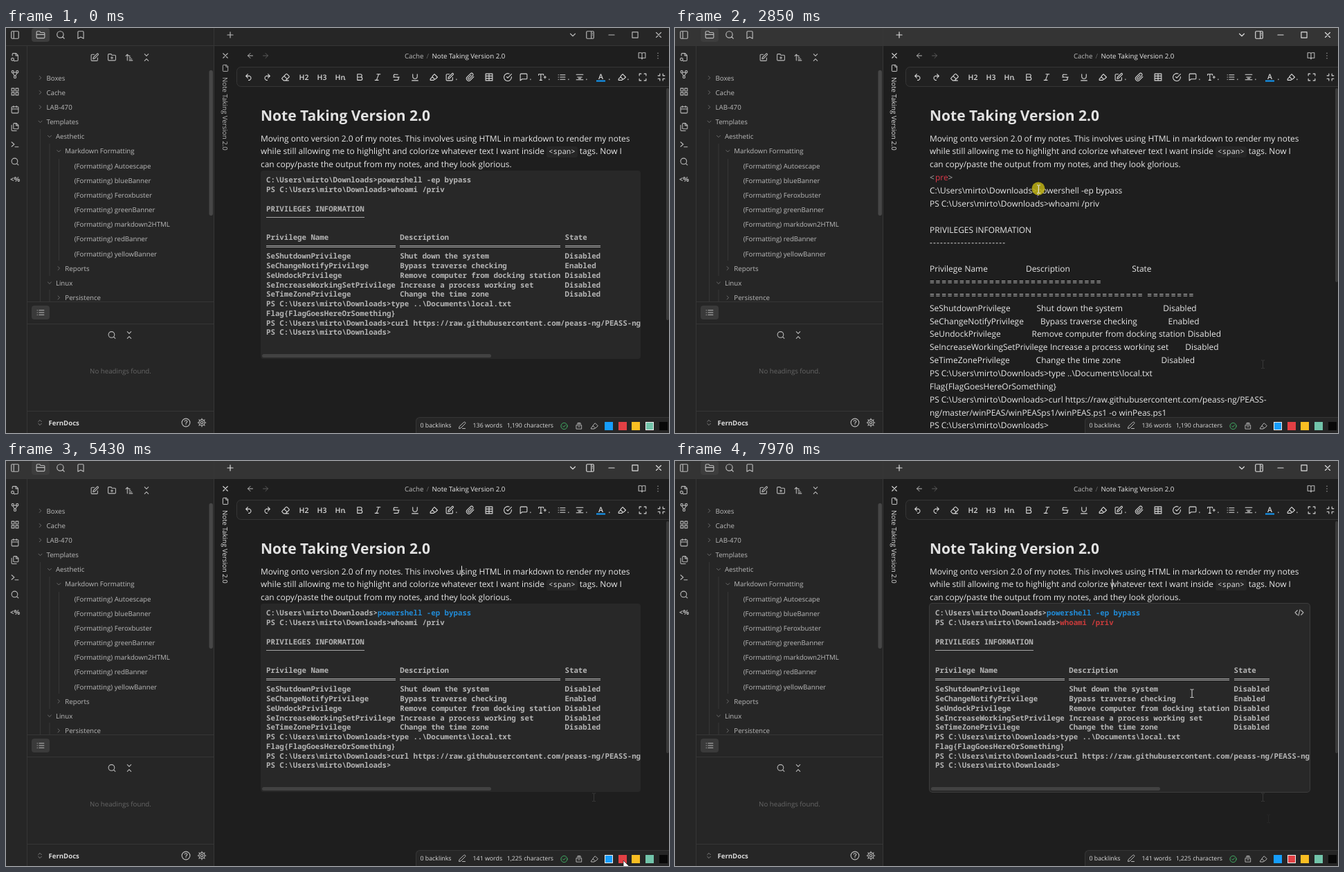
Recreate the animation shown at these times as an HTML page. Size 958 by 585 pixels, loop 8000 ms.

```html
<!DOCTYPE html>
<html lang="en">
<head>
<meta charset="utf-8">
<title>Note editor</title>
<style>
html, body { margin: 0; width: 100%; height: 100%; overflow: hidden; background: #1e1e1e; }
#stage { position: absolute; left: 0; top: 0; width: 958px; height: 585px; overflow: hidden; background: #1e1e1e;
  font-family: "Open Sans", "Noto Sans", sans-serif; color: #e8e8e8; text-rendering: geometricPrecision; }
#stage > *, #status > .abs { position: absolute; }
svg { left: 0; top: 0; overflow: visible; display: block; }
.icon { fill: none; stroke-width: 2; stroke-linecap: round; stroke-linejoin: round; }
.line { height: 18.86px; line-height: 18.86px; font-size: 11.955px; white-space: pre; }
#intro { left: 368px; top: 150.5px; }
#editor { left: 368px; top: 207.1px; }
.table { word-spacing: .34px; }
.dashes { letter-spacing: 1.17px; }
.equals { letter-spacing: 1.77px; }
code, #block { font-family: "Noto Sans Mono", "DejaVu Sans Mono", monospace; font-size: 10.74px; }
code { background: #262626; border-radius: 3px; padding: 1px 3px; color: #dadada; }
mark { display: inline-block; vertical-align: top; height: 100%; min-width: 0; color: inherit; background: none; padding-right: 3px; }
mark.lead { padding: 0; }
.selected mark { background: #3b3057; }
.selected.partial mark.lead { background: none; }
i { font-style: normal; color: #a8a8a8; letter-spacing: 1.1px; }
b { font-weight: 400; color: #dc3a4b; }
u { text-decoration: none; color: #41c269; }
.drag { display: inline-block; vertical-align: top; height: 100%; background: linear-gradient(#3b3057, #3b3057) no-repeat 0 0 / 0 100%; }
#block { left: 368px; top: 206px; width: 549px; height: 272px; overflow: hidden; background: #282828; border-radius: 4px;
  color: #b5b5b5; font-weight: 600; white-space: pre; }
#block.hover { box-shadow: 0 0 0 1px #3c3c3c; }
#block div { height: 13.75px; line-height: 13.75px; padding-left: 8px; }
#block div:first-child { margin-top: 8.4px; }
#block s { display: inline-block; height: 3px; vertical-align: 2.7px; box-sizing: border-box; border: solid #a5a5a5; border-width: 1px 0; }
#block s.single { border-bottom: 0; height: 1px; vertical-align: 4.4px; }
#bar { left: 2px; top: 265px; width: 331px; height: 5px; border-radius: 3px; background: #424242; position: absolute; }
#status { right: 0; bottom: 0; height: 22px; padding: 0 167px 0 6px; display: flex; align-items: center; white-space: pre;
  background: #262626; border: solid #363636; border-width: 1px 0 0 1px; border-radius: 6px 0 0 0; font-size: 8.8px; color: #dadada; }
#status > svg { position: static; margin: 0 9.5px; }
#chars { margin-left: 6.5px; }
.swatch { width: 12px; height: 12px; top: 6px; box-sizing: border-box; }
.swatch.on { border: 1px solid #eee; }
#scroll { left: 954px; top: 87px; width: 4px; border-radius: 2px; background: #3a3a3a; }
</style>
</head>
<body>
<div id="stage"></div>
<script>
const LOOP = 8000;
const PATHS = {
  panel: 'M5 3h14a2 2 0 0 1 2 2v14a2 2 0 0 1-2 2H5a2 2 0 0 1-2-2V5a2 2 0 0 1 2-2zM9 3v18',
  panelRight: 'M5 3h14a2 2 0 0 1 2 2v14a2 2 0 0 1-2 2H5a2 2 0 0 1-2-2V5a2 2 0 0 1 2-2zM15 3v18M18 8h.1M18 12h.1',
  folder: 'M4 20h16a2 2 0 0 0 2-2V8a2 2 0 0 0-2-2h-8l-2-3H4a2 2 0 0 0-2 2v13a2 2 0 0 0 2 2zM2 11h20',
  folderPlus: 'M4 20h16a2 2 0 0 0 2-2V8a2 2 0 0 0-2-2h-8l-2-3H4a2 2 0 0 0-2 2v13a2 2 0 0 0 2 2zM12 10v6M9 13h6',
  search: 'M19 11a8 8 0 1 1-16 0a8 8 0 0 1 16 0zM21 21l-4.3-4.3',
  bookmark: 'M19 21l-7-4-7 4V5a2 2 0 0 1 2-2h10a2 2 0 0 1 2 2z',
  plus: 'M5 12h14M12 5v14', minus: 'M5 12h14', square: 'M5 5h14v14H5z', close: 'M18 6L6 18M6 6l12 12',
  down: 'M6 9l6 6 6-6', right: 'M9 18l6-6-6-6', updown: 'M7 15l5 5 5-5M7 9l5-5 5 5', collapse: 'M7 21l5-5 5 5M7 3l5 5 5-5',
  fileSearch: 'M5 8V4a2 2 0 0 1 2-2h8l5 5v13a2 2 0 0 1-2 2h-6M14 2v6h6M9 18a3.5 3.5 0 1 1-7 0a3.5 3.5 0 0 1 7 0zM9 21l2 2',
  file: 'M15 2H6a2 2 0 0 0-2 2v16a2 2 0 0 0 2 2h12a2 2 0 0 0 2-2V7zM14 2v6h6',
  graph: 'M9 5a3 3 0 1 1-6 0a3 3 0 0 1 6 0zM21 5a3 3 0 1 1-6 0a3 3 0 0 1 6 0zM15 19a3 3 0 1 1-6 0a3 3 0 0 1 6 0zM6 8l5 8M18 8l-5 8M8 7l9 0',
  grid: 'M3 3h7v7H3zM14 3h7v7h-7zM14 14h7v7h-7zM3 14h7v7H3z',
  calendar: 'M5 4h14a2 2 0 0 1 2 2v13a2 2 0 0 1-2 2H5a2 2 0 0 1-2-2V6a2 2 0 0 1 2-2zM3 10h18M8 2v4M16 2v4',
  files: 'M16 2h-6a2 2 0 0 0-2 2v11a2 2 0 0 0 2 2h9a2 2 0 0 0 2-2V7zM3 7v13a2 2 0 0 0 2 2h11M15 2v6h6',
  terminal: 'M3 18l7-6-7-6M12 19h9',
  edit: 'M11 4H5a2 2 0 0 0-2 2v13a2 2 0 0 0 2 2h13a2 2 0 0 0 2-2v-6M18.5 2.5a2.1 2.1 0 0 1 3 3L12 15l-4 1 1-4z',
  sort: 'M3 8l4-4 4 4M7 4v16M12 12h4M12 16h7M12 20h9M12 8h2',
  list: 'M8 6h13M8 12h13M8 18h13M3 6h.5M3 12h.5M3 18h.5',
  help: 'M22 12a10 10 0 1 1-20 0a10 10 0 0 1 20 0zM9 9a3 3 0 0 1 6 1c0 2-3 2-3 4M12 17h.1',
  gear: 'M19 12a7 7 0 1 1-14 0a7 7 0 0 1 14 0zM15 12a3 3 0 1 1-6 0a3 3 0 0 1 6 0zM12 2v3M12 19v3M2 12h3M19 12h3M5 5l2 2M17 17l2 2M5 19l2-2M17 7l2-2',
  back: 'M12 19l-7-7 7-7M19 12H5', forward: 'M12 5l7 7-7 7M5 12h14',
  book: 'M12 6v15M3 4h6a3 3 0 0 1 3 3a3 3 0 0 1 3-3h6v14h-7l-2 2-2-2H3z',
  dots: 'M11.500 5h1M11.500 12h1M11.500 19h1',
  undo: 'M9 14L4 9l5-5M4 9h10a6 6 0 0 1 0 11h-3', redo: 'M15 14l5-5-5-5M20 9H10a6 6 0 0 0 0 11h3',
  eraser: 'M7 21l-4-4a2 2 0 0 1 0-3L13 4a2 2 0 0 1 3 0l5 5a2 2 0 0 1 0 3l-9 9zM8 9l8 8M12 21h8',
  bold: 'M6 4h8a4 4 0 0 1 0 8H6zM6 12h9a4 4 0 0 1 0 8H6z', italic: 'M19 4h-9M14 20H5M15 4L9 20',
  strike: 'M16 5H9a3 3 0 0 0-2 6M14 12a4 4 0 0 1 0 8H6M4 12h16', under: 'M6 4v6a6 6 0 0 0 12 0V4M4 21h16',
  marker: 'M9 11l-6 6v3h9l3-3M22 12l-5 5a2 2 0 0 1-3 0l-5-5a2 2 0 0 1 0-3l5-5z',
  clip: 'M21 11l-9 9a6 6 0 0 1-8.500-8.500l9-9a4 4 0 0 1 5.700 5.700l-9 9a2 2 0 0 1-3-3l8-8',
  table: 'M3 3h18v18H3zM3 9h18M3 15h18M12 3v18',
  check: 'M22 11v1a10 10 0 1 1-6-9M22 4L12 14l-3-3', checkRing: 'M22 12a10 10 0 1 1-20 0a10 10 0 0 1 20 0zM8 12l3 3 5-6',
  comment: 'M21 15a2 2 0 0 1-2 2H8l-5 4V5a2 2 0 0 1 2-2h14a2 2 0 0 1 2 2z',
  type: 'M2 7V4h13v3M8 4v16M5 20h6M16 12h6M19 9v6', align: 'M3 5h18M6 12h12M3 19h18M9 15.500h6',
  expand: 'M8 3H3v5M21 8V3h-5M3 16v5h5M16 21h5v-5', shrink: 'M8 3v5H3M21 8h-5V3M3 16h5v5M16 21v-5h5',
  pencil: 'M17 3a2.800 2.800 0 0 1 4 4L8 20l-5 1 1-5zM13 21h8', stack: 'M4 9h16v12H4zM6 5h12M8 2h8M9 14h6',
  code: 'M17 18l6-6-6-6M7 6l-6 6 6 6M14 4l-4 16'
};
const GREY = '#bababa', LINE = '#363636';
const icon = (name, x, y, size = 13, color = GREY) =>
  `<path class="icon" d="${PATHS[name]}" stroke="${color}" transform="translate(${x - size / 2} ${y - size / 2}) scale(${size / 24})"/>`;
const icons = (names, spots, size, color) => names.split(' ').map((n, i) => icon(n, ...spots[i], size, color)).join('');
const row = (y, ...xs) => xs.map(x => [x, y]);
const column = (x, ...ys) => ys.map(y => [x, y]);
const text = (s, x, y, size = 9.7, fill = GREY, more = '') =>
  `<text x="${x}" y="${y}" font-size="${size}" fill="${fill}" ${more}>${s}</text>`;
const rect = (x, y, w, h, fill, r = 0, more = '') =>
  `<rect x="${x}" y="${y}" width="${w}" height="${h}" fill="${fill}" rx="${r}" ${more}/>`;
const esc = s => s.replace(/&/g, '&amp;').replace(/</g, '&lt;').replace(/>/g, '&gt;');
const svg = body => `<svg width="958" height="585">${body}</svg>`;

// File tree: depth, chevron, label
const tree = [
  [0, 'right', 'Boxes'], [0, 'right', 'Cache'], [0, 'right', 'LAB-470'], [0, 'down', 'Templates'],
  [1, 'down', 'Aesthetic'], [2, 'down', 'Markdown Formatting'],
  ...'Autoescape blueBanner Feroxbuster greenBanner markdown2HTML redBanner yellowBanner'.split(' ').map(n => [3, '', `(Formatting) ${n}`]),
  [2, 'right', 'Reports'], [1, 'down', 'Linux'], [2, 'right', 'Persistence']
].map(([depth, arrow, label], i) => {
  const y = 71.9 + 21.17 * i;
  return (arrow ? icon(arrow, 49.5 + 13.4 * depth, y, 10, '#777') : '') + text(label, 58.5 + 13.4 * depth, y + 3.6);
}).join('');

function chrome() {
  const title = 'Note Taking Version 2.0';
  const tool = '#dadada';
  return rect(0, 0, 301, 585, '#262626') +
    rect(0, 0, 958, 25, '#262626', 0, 'id="titlebar"') + rect(0, 25, 958, 1, LINE) +
    rect(30, 26, 1, 559, LINE) + rect(300, 0, 1, 585, LINE) +
    [395, 427, 553].map(y => rect(31, y, 269, 1, LINE)).join('') +
    rect(37, 0, 26, 20, '#3d3d3d', 4) + rect(37, 401, 26, 20, '#3a3a3a', 4) +
    icons('panel folder search bookmark', row(10, 13, 50, 79, 108), 14) +
    // Parts that brighten when the window gains focus
    `<g id="controls">${icons('plus down panelRight minus square close', row(10, 324, 819, 844, 875, 909, 943), 14, 'currentColor') +
      icon('close', 317, 40, 13, 'currentColor') + icon('file', 317, 58, 11, 'currentColor') +
      text(title, 0, 0, 9.7, 'currentColor', 'transform="translate(313 71) rotate(90)"')}</g>` +
    icons('fileSearch graph grid calendar files terminal search', column(13, 42, 67, 92, 118, 143, 168, 193), 13) +
    text('&lt;%', 6, 222, 9.7, GREY, 'font-weight="700"') +
    icons('edit folderPlus sort collapse', row(42.5, 128, 153, 178, 203), 13) +
    rect(49, 146, 1, 249, LINE) + rect(62.5, 167, 1, 191, LINE) + rect(62.5, 378, 1, 17, LINE) + rect(76, 189, 1, 147, LINE) +
    tree + rect(293.5, 61, 5.5, 210, '#464646', 2.7) +
    icons('list search collapse', [[50, 411], [153, 443.5], [178, 443.5]], 13) +
    text('No headings found.', 165.5, 498.5, 9.7, '#666', 'text-anchor="middle"') +
    icon('updown', 49, 570, 11, '#888') + text('FernDocs', 61.5, 573.6, 9.6, '#dadada', 'font-weight="700"') +
    icons('help gear', row(570, 260, 283), 14) +
    icon('back', 353, 40, 12) + icon('forward', 375, 40, 12, '#5a5a5a') +
    text('Cache', 576, 43.7) + text('/', 607.5, 43.7, 9.7, '#666') + text(title, 615.5, 43.7, 9.7, '#e8e8e8') +
    icons('book dots', row(40, 919, 942), 13) +
    rect(333.5, 56.5, 640, 28, '#212121', 6, `stroke="${LINE}"`) +
    icons('undo redo eraser', row(71, 351, 377, 404), 13, tool) +
    ['H2', 'H3', 'Hn'].map((s, i) => text(s, 423.5 + 26 * i, 75, 10.5, tool, 'font-weight="600"')).join('') +
    icons('bold italic strike under marker edit clip table check comment type list align',
      row(71, 511, 537, 564, 591, 618, 641, 671, 698, 725, 748, 775, 803, 829), 13, tool) +
    text('A', 856, 74, 10.5, tool, 'font-weight="600"') + rect(853, 75.5, 13, 2, '#149dff') +
    icons('marker expand shrink', row(71, 890, 920, 947), 13, tool) +
    [489, 650, 757, 784, 812, 838, 871, 898].map(x => rect(x, 73.5, 1.6, 1.6, '#999')).join('') +
    text(title, 368, 133.6, 21, '#e2e2e2', 'font-weight="700"');
}

const path = 'C:\\Users\\mirto\\Downloads>';
const prompt = 'PS ' + path;
const privileges = [
  ['SeShutdownPrivilege', 'Shut down the system', 'Disabled'],
  ['SeChangeNotifyPrivilege', 'Bypass traverse checking', 'Enabled'],
  ['SeUndockPrivilege', 'Remove computer from docking station', 'Disabled'],
  ['SeIncreaseWorkingSetPrivilege', 'Increase a process working set', 'Disabled'],
  ['SeTimeZonePrivilege', 'Change the time zone', 'Disabled']
];
const tableRow = ([a, b, c]) => a.padEnd(30) + b.padEnd(37) + c;
const header = tableRow(['Privilege Name', 'Description', 'State']);
const flag = 'Flag{FlagGoesHereOrSomething}';
const commands = ['powershell -ep bypass', 'whoami /priv'];
const colors = ['#149dff', '#e93d3d'];

const line = (html, cls = '') => `<div class="line ${cls}">${html}</div>`;
const plain = (s, cls) => line(`<mark>${esc(s)}</mark>`, cls);
const shell = (start, n) => line(`<mark>${esc(start)}` +
  `<span class="wrap${n}"><i>&lt;</i><b>span</b> style<i>=</i><u>"color:${colors[n]}"</u><i>&gt;</i></span>` +
  `<span class="drag" id="drag${n}">${commands[n]}</span>` +
  `<span class="wrap${n}"><i>&lt;/</i><b>span</b><i>&gt;</i></span></mark>`);
const editor = line('<mark class="lead"><i>&lt;</i></mark><mark><b>pre</b><i>&gt;</i></mark>') +
  shell(path, 0) + shell(prompt, 1) + plain('') + plain('PRIVILEGES INFORMATION') + plain('-'.repeat(22), 'dashes') + plain('') +
  plain(header, 'table') + plain('='.repeat(29) + ' ', 'equals') + plain('='.repeat(36) + ' ' + '='.repeat(8), 'equals') +
  privileges.map(p => plain(tableRow(p), 'table')).join('') +
  plain(prompt + 'type ..\\Documents\\local.txt') + plain(flag) +
  plain(prompt + 'curl https://raw.githubusercontent.com/peass-ng/PEASS-') +
  plain('ng/master/winPEAS/winPEASps1/winPEAS.ps1 -o winPeas.ps1') + plain(prompt);

const rule = (n, cls = '') => `<s class="${cls}" style="width:${n}ch"></s>`;
const block = [
  esc(path) + `<span id="cmd0">${commands[0]}</span>`, esc(prompt) + `<span id="cmd1">${commands[1]}</span>`, '',
  'PRIVILEGES INFORMATION', rule(22, 'single'), '', header, [29, 36, 8].map(n => rule(n)).join(' '),
  ...privileges.map(tableRow), esc(prompt) + 'type ..\\Documents\\local.txt', flag,
  esc(prompt) + 'curl https://raw.githubusercontent.com/peass-ng/PEASS-ng/master/winPEAS', esc(prompt)
].map(s => `<div>${s}</div>`).join('') + '<span id="bar"></span>';

const beam = (x, y, color, more = '') => `<path d="M-2.5-5.5h2l.5.5.5-.5h2M0-5V5.5M-2.5 6h2l.5-.5.5.5h2" fill="none" stroke="${color}" transform="translate(${x} ${y})" ${more}/>`;
const swatches = ['#169dfb', '#e24044', '#f9be22', '#72c4aa', '#080808']
  .map((c, i) => `<span class="abs swatch" style="right:${81 - 19.7 * i}px;background:${c}"></span>`).join('');

const $ = id => document.getElementById(id);
$('stage').innerHTML = svg(chrome()) +
  `<div id="intro">${line('Moving onto version 2.0 of my notes. This involves using HTML in markdown to render my notes') +
    line('while still allowing me to highlight and colorize whatever text I want inside <code>&lt;span&gt;</code> tags. Now I') +
    line('can copy/paste the output from my notes, and they look glorious.')}</div>` +
  `<div id="block">${block}</div><div id="editor">${editor}</div><div id="scroll"></div>` +
  `<div id="status"><span>0 backlinks</span><svg width="12" height="12">${icon('pencil', 6, 6, 12)}</svg>` +
  `<span id="words"></span><span id="chars"></span>${swatches}</div>` +
  svg(icon('checkRing', 806.5, 575, 11, '#44b86a') + icon('stack', 828, 575, 11) + icon('marker', 850, 575, 12) +
    `<g id="edit">${icon('code', 902, 219, 13)}</g>` +
    beam(849.5, 485.5, '#383838', 'id="trace0"') + beam(857.5, 516.5, '#262626', 'id="trace1"') +
    rect(0, -7.5, 1, 15, '#eee', 0, 'id="caret"') +
    '<circle id="press" r="9.5" fill="#bdb014" fill-opacity=".85"/>' + beam(0, 0, '#ddd', 'id="beam"') +
    '<path id="arrow" d="M0 0v13l3-3 2 5 2-1-2-5h4z" fill="#fff" stroke="#222" stroke-width=".7"/>');

// Each table row starts with the time from which it applies
const MOUSE = [
  [0, 882, 600], [350, 880, 588], [490, 877, 577], [1060, 877, 577], [1250, 849, 485], [1800, 672.5, 287.5],
  [2190, 672.5, 287.5], [2680, 525.5, 232.5], [2850, 525.5, 232.5], [3300, 648, 235], [3640, 655, 236], [3850, 655, 236],
  [4180, 658, 160], [4300, 658, 160], [4520, 745.5, 271.5], [4620, 745.5, 271.5], [5330, 892, 577], [5480, 892, 577],
  [5560, 857, 516], [5710, 642.5, 273.5], [6250, 642.5, 273.5], [6740, 549.5, 254.5], [6830, 549.5, 254.5],
  [7000, 614, 254], [7250, 614, 254], [7560, 632, 178], [7820, 632, 178], [7970, 747, 335.5], [8000, 747, 335.5]
];
const EDITING = [[0, 0], [1890, 1], [4280, 0], [5720, 1], [7740, 0]];
const SELECTED = [[0, ''], [1890, 'selected partial'], [1990, ''], [5720, 'selected'], [5900, '']];
const ACTIVE = [[0, 3], [690, 0], [5440, 1]];
const COUNT = [[0, '136', '1,190'], [3100, '3', '21'], [4250, '136', '1,190'], [4700, '141', '1,225'], [6970, '2', '12'], [7700, '141', '1,225']];
const CARET = [
  [0], [1890, 376, 215.5], [1990], [2790, 524.5, 234.5], [2950], [4280, 658, 159], [4780], [5260, 658, 159], [5440],
  [5720, 368, 215.5], [5900], [6790, 540.5, 253.5], [6900], [7740, 631.5, 178]
];
const PRESSED = [[0, 0], [690, 1], [840, 0], [1780, 1], [1885, 0], [2790, 1], [3300, 0], [4230, 1], [4330, 0],
  [5440, 1], [5480, 0], [5670, 1], [5740, 0], [6790, 1], [7010, 0], [7700, 1], [7790, 0]];
const DRAGS = [[2850, 4280, 524], [6830, 7740, 541]];
const WRAPPED = [3900, 7250];
const PAINTED = ['#218cd8', '#c83b3b'];

const indexAt = (table, t) => table.findLastIndex(r => r[0] <= t);
const at = (table, t) => table[indexAt(table, t)].slice(1);

function mouseAt(t) {
  const i = Math.min(indexAt(MOUSE, t), MOUSE.length - 2);
  const [t0, x0, y0] = MOUSE[i], [t1, x1, y1] = MOUSE[i + 1];
  const k = (t - t0) / (t1 - t0), e = k * k * (3 - 2 * k);
  return [x0 + (x1 - x0) * e, y0 + (y1 - y0) * e];
}
const show = (el, on) => { el.style.display = on ? '' : 'none'; };
const place = (el, x, y) => el.setAttribute('transform', `translate(${x} ${y})`);
const swatchEls = [...document.querySelectorAll('.swatch')];

function paint(t) {
  const [x, y] = mouseAt(t), [editing] = at(EDITING, t), focused = t >= 690;
  $('titlebar').setAttribute('fill', focused ? '#343434' : '#262626');
  $('controls').style.color = focused ? '#dedede' : '#b8b8b8';

  const hover = !editing && x > 368 && x < 917 && y > 206 && y < 478;
  show($('editor'), editing);
  show($('block'), !editing);
  $('block').className = hover ? 'hover' : '';
  show($('edit'), hover);
  $('scroll').style.height = (editing ? 280 : 335) + 'px';
  $('editor').className = at(SELECTED, t)[0];

  WRAPPED.forEach((start, n) => {
    const wrapped = t >= start;
    document.querySelectorAll('.wrap' + n).forEach(el => show(el, wrapped));
    $('cmd' + n).style.color = wrapped ? PAINTED[n] : '';
    const [from, to, left] = DRAGS[n];
    const width = t < from || t >= to ? 0 : wrapped ? 200 : Math.max(0, x - left);
    $('drag' + n).style.backgroundSize = `${width}px 100%`;
  });

  const [words, chars] = at(COUNT, t);
  $('words').textContent = words + ' words';
  $('chars').textContent = chars + ' characters';
  const [active] = at(ACTIVE, t);
  swatchEls.forEach((el, i) => el.classList.toggle('on', i === active));

  const [cx, cy] = at(CARET, t);
  show($('caret'), cx);
  if (cx) place($('caret'), cx, cy);
  show($('trace0'), t >= 1250);
  show($('trace1'), t >= 5560);
  show($('press'), at(PRESSED, t)[0]);
  place($('press'), x - .5, y - .5);
  const overStatus = y > 562;
  show($('beam'), !overStatus);
  show($('arrow'), overStatus);
  place($('beam'), x, y);
  place($('arrow'), x, y);
}

function tick() {
  paint(performance.now() % LOOP);
  requestAnimationFrame(tick);
}
tick();
</script>
</body>
</html>
```
